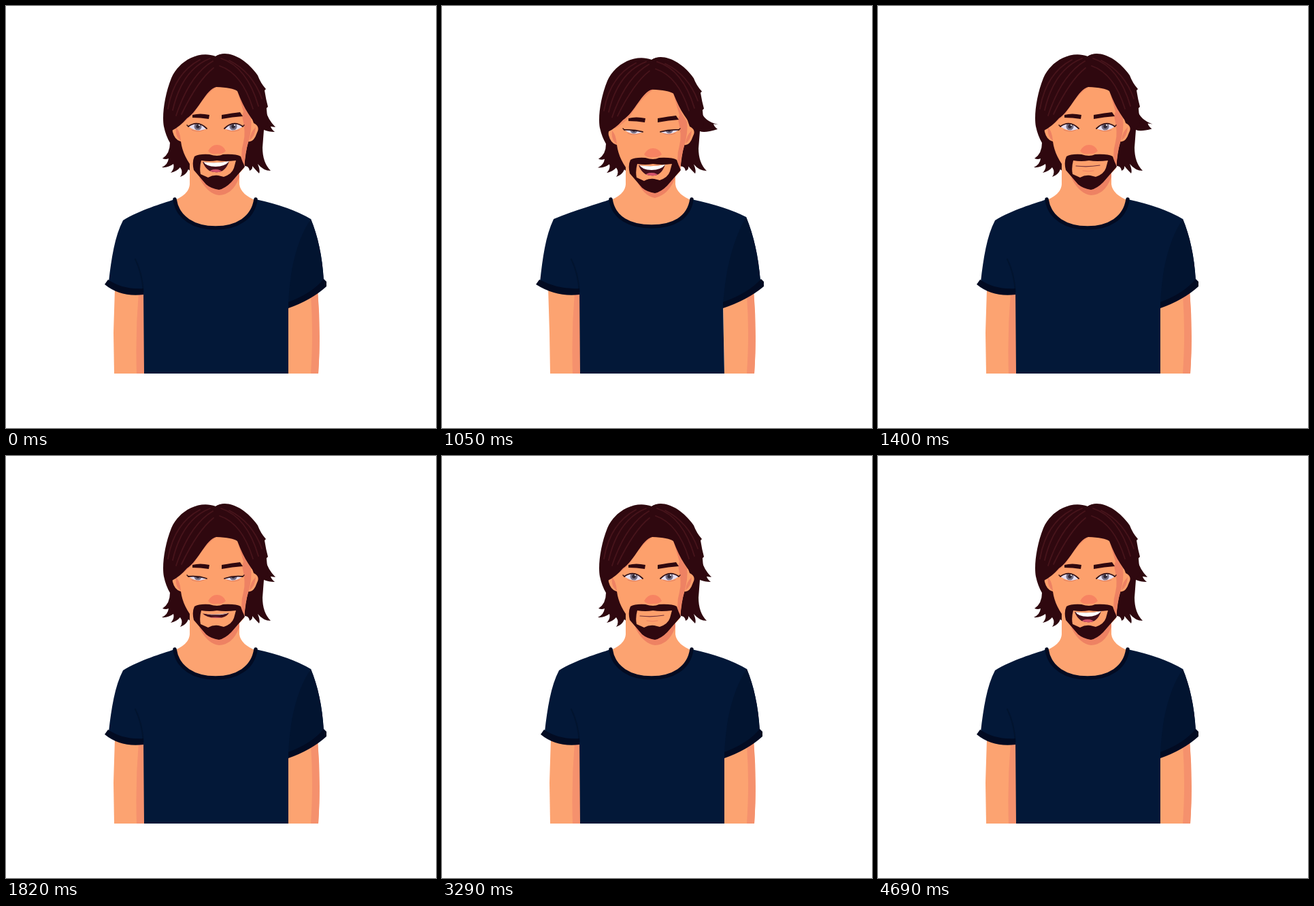
An HTML page for the animation above (4900 ms loop, 632 by 620 pixels).

```html
<!DOCTYPE html>
<html>
<head>
<meta charset="utf-8">
<style>
html, body { margin: 0; width: 100%; height: 100%; overflow: hidden; background: #fff; }
svg { display: block; }
</style>
</head>
<body>
<svg id="stage" width="632" height="620" viewBox="0 0 632 620"></svg>
<script>
const LOOP = 4900, STEP = 70;
const SKIN = '#fda06c', LIMB = '#fca371', SHADE = '#ee8263', SOFT = '#f5916d';
const HAIR = '#2f080f', STRAND = '#47141b', SHIRT = '#031838', TRIM = '#020b22';
const stage = document.getElementById('stage');

// [start time, value]: each value holds until the next start
const MOUTH = [[0, 1], [350, .5], [840, .7], [910, .85], [980, 1], [1190, .7], [1260, .4], [1330, 0],
  [1820, .4], [1960, .8], [2100, 1], [2380, .5], [2450, 0], [2730, .4], [2800, .8], [2870, 1],
  [3010, .6], [3150, .8], [3290, 0], [3640, .5], [3920, .8], [3990, .6], [4060, .8], [4340, .5], [4690, 1]];
const BLINK = [[0, 0], [1820, .5], [1890, 1], [2030, .5], [2100, 0], [2380, .35], [2450, 0],
  [2730, .5], [2800, 1], [2940, .5], [3010, 0]];

const held = (list, t) => list.filter(k => k[0] <= t).pop()[1];
const mix = (a, b, k) => a + (b - a) * k;
const fill = (d, color) => `<path d="${d}" fill="${color}"/>`;
const line = (d, color, w) => `<path d="${d}" fill="none" stroke="${color}" stroke-width="${w}" stroke-linecap="round"/>`;

function body(a) {
  const l = 8 * a, s = 7 * a, r = 2 * a;
  const shoulderL = `${172 - l} ${315 - 2 * a}`, shoulderR = `${448 - a} ${313 - 3 * a}`;
  const collar = `C363 312 339 ${326 - r} 308 ${326 - r}S252 312 248 284`;
  const arms =
    fill(`M${160 - 4 * a} 415L158 480 159 540H204V415Z`, LIMB) +
    fill('M195 420Q190 480 192 540H204V420Z', SOFT) +
    fill(`M${415 - r} 435L458 415Q463 480 459 540H415Z`, LIMB) +
    fill('M448 425Q452 480 448 540H459Q463 480 458 418Z', SOFT);
  const neck =
    fill('M270 225V262Q269 277 246 286Q256 328 308 328T368 286Q345 277 343 262V225Z', LIMB) +
    fill(`M284 252Q296 ${276 + 4 * a} 313 ${278 + 4 * a}Q334 277 343 251V238Z`, SHADE);
  const sleeve = `M${shoulderR}C430 340 417 380 ${415 - r} 440Q448 430 ${467 + r / 2} 404C465 367 458 337 ${shoulderR}Z`;
  const shirt = `M248 284C228 291 198 299 ${shoulderL}C${160 - l} 338 ${155 - s} 370 ${151 - s} 405` +
    `Q175 421 202 419L203 540H415L${415 - r} 440Q448 430 ${467 + r / 2} 404C465 367 458 337 ${shoulderR}` +
    `Q418 295 367 284${collar}Z`;
  return arms + neck + fill(shirt, SHIRT) + fill(sleeve, '#021430') +
    line('M190 372Q200 392 202 420', '#02142f', 2) +
    fill(`M${150 - s} 402Q172 417 202 415V424Q168 428 ${145 - s} 409Z`, TRIM) +
    fill(`M${415 - r} 435Q450 422 ${467 + r} 401L${471 + r} 405V412Q449 432 ${415 - r} 444Z`, TRIM) +
    line('M367 284' + collar, TRIM, 5.5);
}

function backHair(tipX, tipY) {
  return fill('M308 73C282 63 252 82 243 105C233 130 229 160 232 176Q235 190 241 200Q241 216 230 223Q235 225 239 223' +
    'Q238 232 229 236Q238 237 246 231Q248 238 242 244Q251 242 256 236Q261 243 256 250Q265 247 268 239L274 244V220H346L351 234' +
    'Q357 234 358 241Q363 239 362 234Q366 239 372 245Q374 241 370 231Q378 241 389 241Q377 229 377 207L379 181' +
    `Q386 184 ${tipX} ${tipY}Q${tipX - 5} ${tipY - 4} ${tipX - 6} ${tipY - 8}L${tipX + 1} ${tipY - 7}Q385 166 381 151L385 147Q382 136 380 123L382 121` +
    'Q374 112 370 101C352 75 324 62 308 73Z', HAIR);
}

function frontHair() {
  const strands = ['M300 76Q259 92 245 152', 'M304 80Q270 100 250 160', 'M305 90Q282 108 258 158',
    'M285 78Q247 98 238 150', 'M316 76Q354 88 371 146', 'M314 87Q347 98 363 150', 'M328 79Q362 96 376 135'];
  return fill('M308 73C270 66 241 98 236 145Q231 163 236 184L242 183Q255 177 266 164C283 153 294 121 309 118' +
    'Q333 119 340 124Q348 145 356 157Q365 172 378 181L384 173Q385 135 369 105C352 77 325 63 308 73Z', HAIR) +
    strands.map(d => line(d, STRAND, 1.8)).join('');
}

function face() {
  return fill('M306 105C280 125 263 155 253 171Q243 176 245 185Q248 197 257 199Q260 222 278 242L296 262H328L350 238' +
    'Q352 215 356 199Q364 201 369 186Q374 177 364 172Q350 130 335 112Z', SKIN) +
    fill('M312 117Q292 130 276 158Q262 172 254 175L252 170Q270 143 294 117Z', '#f28d65') +
    fill('M340 124Q349 149 360 165Q362 180 356 201Q351 216 350 238Q343 220 349 200Q353 185 347 162L349 155Z', SHADE) +
    fill('M250 178Q256 185 257 198Q248 192 250 178ZM367 178Q359 185 358 197Q366 192 367 178Z', SHADE) +
    fill('M297 213Q302 204 310 204Q319 204 323 213Q318 218 311 217Q302 219 297 213Z', '#f78362') +
    fill('M274 160Q285 157 299 160L298 166Q286 164 274 164Z', HAIR) +
    fill('M317 160Q334 157 344 156L348 162Q333 163 317 166Z', HAIR);
}

function eye(x, dir, shut, id) {
  const top = mix(167, 184, shut), inner = x + 13 * dir, outer = x - 14 * dir;
  const edge = `M${outer} 177Q${x} ${top} ${inner} 180`;
  return `<clipPath id="${id}"><path d="${edge}Q${x} 187 ${outer} 177Z"/></clipPath>` +
    `<g clip-path="url(#${id})"><rect x="${x - 16}" y="165" width="32" height="22" fill="#e5def0"/>` +
    `<circle cx="${x}" cy="177" r="5.5" fill="#777086"/><circle cx="${x}" cy="177" r="2.7" fill="#302735"/>` +
    `<circle cx="${x + 2}" cy="175" r="1.1" fill="#fff"/></g>` +
    line(edge, '#301015', 1.8) + line(`M${outer} 177l${-2 * dir} -2`, '#301015', 1.5) +
    line(`M${x - 9 * dir} 182Q${x} 186 ${x + 9 * dir} 182`, '#d9775d', .8);
}

function mouth(m) {
  const beard = 'M277 221Q284 217 299 218Q311 222 319 218Q338 217 345 221Q347 228 351 236L331 259' +
    'Q322 268 313 270Q301 268 294 262L276 241Q273 229 277 221Z' +
    'M287 227Q284 238 286 247L297 252Q304 248 312 249L320 251Q332 247 335 238L338 227Q322 229 310 227Q299 229 287 227Z';
  const hair = `<path d="${beard}" fill="${HAIR}" fill-rule="evenodd"/>`;
  if (!m) return hair + line('M291 235Q309 237 326 234', '#71303a', 1.2) + line('M301 242Q309 244 317 242', SHADE, 1);
  const y = mix(233, 229, m), low = mix(238, 249, m), teeth = y + 1 + 6 * m * m;
  const shape = `M289 ${y}Q308 ${y + 3} 328 ${y - 1}Q322 ${low - 3} 307 ${low - 5}Q295 ${low - 5} 289 ${y}Z`;
  return hair + `<clipPath id="lips"><path d="${shape}"/></clipPath>` + fill(shape, '#43101c') +
    `<g clip-path="url(#lips)">` + fill(`M289 ${y - 2}H329Q323 ${teeth} 308 ${teeth}T289 ${y - 2}Z`, '#fff') +
    `<ellipse cx="308" cy="${low - 4}" rx="10" ry="${5 * m}" fill="#d3536c"/></g>`;
}

function draw(t) {
  const u = (t - 560) / 840;
  const a = u > 0 && u < 1 ? 1.06 * Math.sin(Math.PI * u) ** 2 : 0;
  // the loose lock lifts with the nod and drops back at once later
  const lift = t < 630 || t >= 1680 ? 0 : t > 1120 ? .75 : Math.min(1, (t - 560) / 490);
  const shut = Math.max(.55 * a * a, held(BLINK, t));
  const squash = `<g transform="translate(0 ${1 + 7 * a}) scale(1 ${1 - .028 * a})">`;
  stage.innerHTML =
    squash + backHair(395 + 10 * lift, 184 - 6 * lift) + '</g>' + body(a) +
    `<g transform="translate(0 ${5 * a})">` + face() +
    eye(282, 1, shut, 'eyeL') + eye(334, -1, shut, 'eyeR') + mouth(held(MOUTH, t)) + '</g>' +
    squash + frontHair() + '</g>';
}

let last = -1;
function tick() {
  const t = Math.floor(performance.now() % LOOP / STEP) * STEP;
  if (t !== last) draw(last = t);
  requestAnimationFrame(tick);
}
tick();
</script>
</body>
</html>
```
